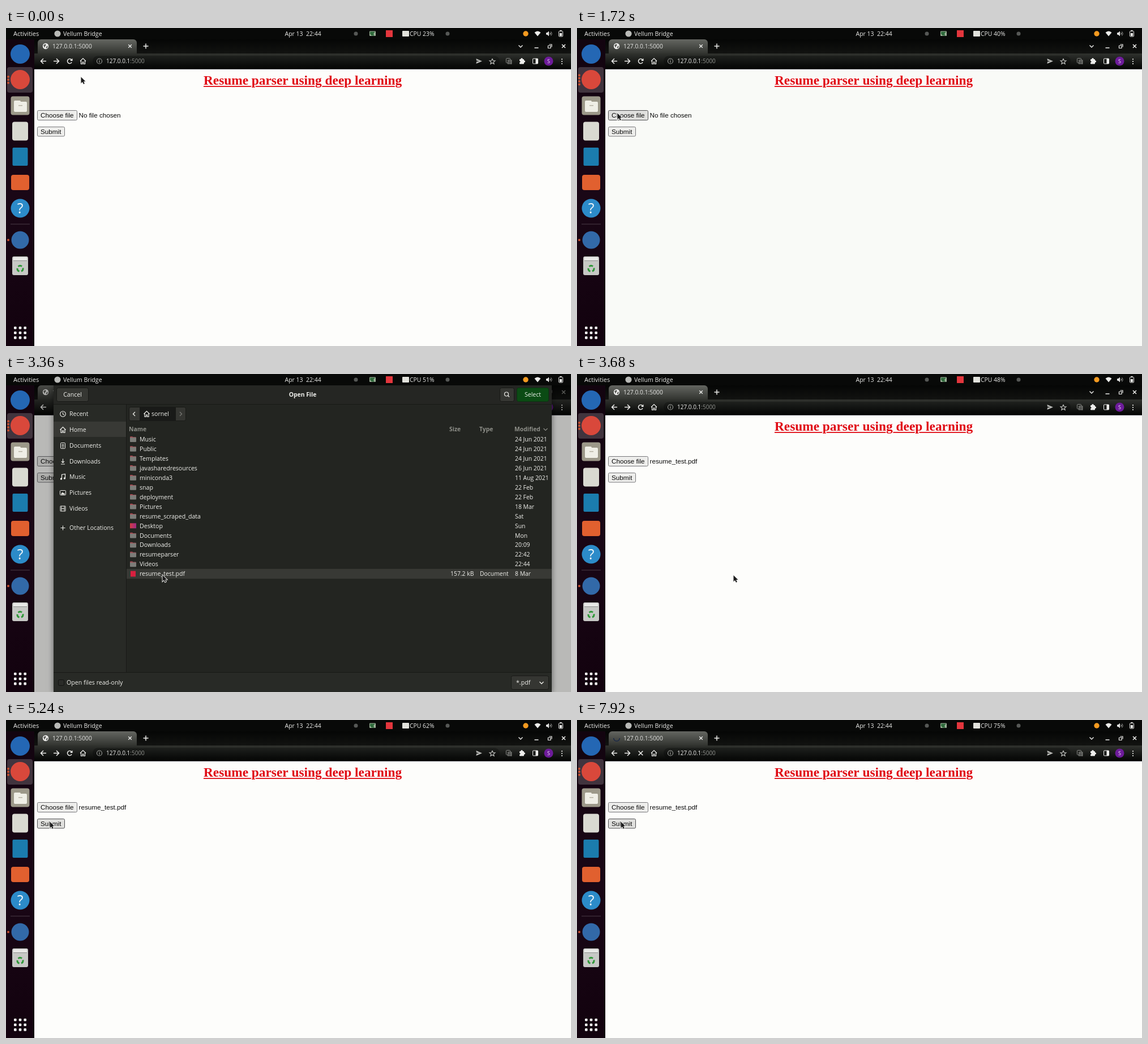
Recreate the animation shown at these times as an HTML page with a canvas. Size 998 by 561 pixels, loop 8000 ms.

```html
<!DOCTYPE html>
<html lang="en">
<head>
<meta charset="utf-8">
<title>Resume parser demo</title>
<style>
html, body { margin: 0; width: 100%; height: 100%; overflow: hidden; background: #000; }
canvas { display: block; width: 998px; height: 561px; }
</style>
</head>
<body>
<canvas id="stage" width="998" height="561"></canvas>
<script>
const ctx = document.getElementById('stage').getContext('2d');
const LOOP = 8000;
const UI = '"Open Sans", "Noto Sans", sans-serif';
const PAGE_FONT = '11.7px "Liberation Sans", Arial, sans-serif';
const PAPER = '#fdfdfb';
const OPEN = 1800, CLOSE = 3480, LOADING = 5440;

// time, x, y of the pointer tip
const PATH = [[0, 132, 86], [300, 132, 86], [1250, 71, 150], [1840, 71, 150],
  [2080, 250, 306], [2750, 276, 354], [4300, 276, 355], [5040, 77, 179], [LOOP, 77, 179]];
const CPU = [23, 40, 51, 48, 62, 75];

const PLACES = [['Recent', 70], ['Home', 98], ['Documents', 126], ['Downloads', 154],
  ['Music', 181], ['Pictures', 209], ['Videos', 237], ['Other Locations', 271]];
const FILES = [['Music', '24 Jun 2021'], ['Public', '24 Jun 2021'], ['Templates', '24 Jun 2021'],
  ['javasharedresources', '26 Jun 2021'], ['miniconda3', '11 Aug 2021'], ['snap', '22 Feb'],
  ['deployment', '22 Feb'], ['Pictures', '18 Mar'], ['resume_scraped_data', 'Sat'],
  ['Desktop', 'Sun'], ['Documents', 'Mon'], ['Downloads', '20:09'], ['resumeparser', '22:42'],
  ['Videos', '22:44'], ['resume_test.pdf', '8 Mar']];

const clamp = v => Math.max(0, Math.min(1, v));
const ramp = (t, from, to) => clamp((t - from) / (to - from));
const smooth = p => p * p * (3 - 2 * p);
const mix = (a, b, p) => a + (b - a) * p;
const shade = (a, b, p) => `rgb(${a.map((v, i) => Math.round(mix(v, b[i], p))).join(',')})`;
const dialogFocus = t => ramp(t, 2080, 2280) * (1 - ramp(t, CLOSE, CLOSE + 120));

function rect(x, y, w, h, color) {
  ctx.fillStyle = color;
  ctx.fillRect(x, y, w, h);
}

function box(x, y, w, h, r, fill, stroke) {
  ctx.beginPath();
  ctx.roundRect(x, y, w, h, r);
  if (fill) { ctx.fillStyle = fill; ctx.fill(); }
  if (stroke) { ctx.strokeStyle = stroke; ctx.lineWidth = 1; ctx.stroke(); }
}

function disc(x, y, r, color) {
  ctx.beginPath();
  ctx.arc(x, y, r, 0, Math.PI * 2);
  ctx.fillStyle = color;
  ctx.fill();
}

function arc(x, y, r, from, to, color, width = 1.3) {
  ctx.beginPath();
  ctx.arc(x, y, r, from, to);
  ctx.strokeStyle = color;
  ctx.lineWidth = width;
  ctx.stroke();
}

const ring = (x, y, r, color, width) => arc(x, y, r, 0, Math.PI * 2, color, width);

// Each string of "x,y x,y" points is one open stroke.
function lines(x, y, color, width, ...strokes) {
  ctx.strokeStyle = color;
  ctx.lineWidth = width;
  ctx.beginPath();
  for (const stroke of strokes) {
    stroke.split(' ').forEach((pair, i) => {
      const [dx, dy] = pair.split(',').map(Number);
      if (i) ctx.lineTo(x + dx, y + dy); else ctx.moveTo(x + dx, y + dy);
    });
  }
  ctx.stroke();
}

function shape(x, y, path, color) {
  ctx.save();
  ctx.translate(x, y);
  ctx.fillStyle = color;
  ctx.fill(new Path2D(path));
  ctx.restore();
}

function text(s, x, y, color, font = '10.6px ' + UI, align = 'left') {
  ctx.font = font;
  ctx.textAlign = align;
  ctx.fillStyle = color;
  ctx.fillText(s, x, y);
}

function gradient(y0, y1, ...colors) {
  const g = ctx.createLinearGradient(0, y0, 0, y1);
  colors.forEach((c, i) => g.addColorStop(i / (colors.length - 1), c));
  return g;
}

const cross = (x, y, r, color, width) =>
  lines(x, y, color, width, `${-r},${-r} ${r},${r}`, `${r},${-r} ${-r},${r}`);
const house = (x, y, color) =>
  lines(x, y, color, 1.2, '-5,0 0,-5 5,0', '-3.5,-1 -3.5,5 -1,5 -1,1.5 1,1.5 1,5 3.5,5 3.5,-1');

function topBar(t) {
  const white = '#ececea';
  rect(0, 0, 998, 20, '#080908');
  text('Activities', 13, 13.7, white, '11px ' + UI);
  disc(91, 10, 5.6, '#b9bab7');
  text('Vellum Bridge', 101, 13.7, white);
  text('Apr 13  22:44', 492.5, 13.5, white, '10.5px ' + UI);
  disc(618, 10, 3.5, '#565856');
  disc(780, 10, 3.5, '#565856');
  box(642, 5.5, 11, 8.5, 1, '#9fb29a');
  shape(642, 5.5, 'M1 1H10L7 5 9 8H4L1 5Z', '#2f6b3c');
  rect(671, 4, 12, 12, '#e3363d');
  box(700, 5, 12, 10, 1, '#e2e2dc');
  const value = CPU[Math.min(5, Math.floor((t + 900) / 1500))];
  text(`CPU ${value}%`, 713, 13.7, white, '10.4px ' + UI);
  disc(918, 10, 4.7, '#f49a20');
  shape(939, 10, 'M0 4.5L-5.5 -2Q0 -7 5.5 -2Z', white);
  shape(956, 10, 'M-2 -1.7H0L3 -4.5V4.5L0 1.7H-2Z', white);
  arc(959, 10, 2.5, -0.8, 0.8, white, 1);
  arc(959, 10, 5, -0.8, 0.8, '#a9a9a7', 1);
  box(976.5, 5.5, 7, 9.5, 1, null, white);
  rect(978.5, 4, 3, 1.5, white);
  rect(978, 9, 4, 5, white);
}

function dock(t) {
  rect(0, 20, 50, 541, gradient(20, 561, '#12040f', '#1a0716', '#12020e'));
  box(2, 69, 45, 45, 4, '#41343e');
  const count = t >= 1560 && t < CLOSE + 120 ? 4 : 3;
  for (let i = 0; i < count; i++) disc(4, 91.3 + (i - (count - 1) / 2) * 5.4, 2, '#c9502f');
  disc(4, 374, 2, '#c9502f');

  disc(25, 46, 17, '#2467b4');
  disc(25, 91, 17, '#d9483b');

  box(8.5, 120.5, 33, 33, 4, '#9c9889');
  box(14, 128, 12, 8, 2, '#efeee6');
  box(14, 130, 23, 18, 2, '#efeee6');
  rect(22, 136, 7, 1.5, '#b8b4a6');

  box(11, 165.5, 28, 33, 4, '#d9d9d1');
  box(11.5, 211, 27, 32, 2, '#1b7cae');
  box(9, 259, 32, 27, 4, '#e1602f');

  disc(25, 318, 16.5, '#2c8bc9');
  text('?', 25, 327, '#f4f8fb', '25px ' + UI, 'center');
  rect(8, 345.5, 34, 1, '#4b3d48');
  disc(25, 374, 15.5, '#3269a8');

  box(11, 403, 28, 33, 3, '#c7c8c5');
  rect(13, 404.5, 24, 6, '#e9e9e7');
  lines(13, 410.5, '#8e8f8d', 1, '0,0 24,0');
  for (let i = 0; i < 3; i++) {
    const a = i * Math.PI * 2 / 3 - Math.PI / 2;
    arc(25, 424.5, 5, a - 0.75, a + 0.65, '#2f9838', 3);
  }

  for (let i = 0; i < 9; i++) {
    box(14 + i % 3 * 8.7, 526.7 + Math.floor(i / 3) * 8.7, 4.6, 4.6, 1.3, '#f4f4f4');
  }
}

function browser(t) {
  const white = '#eeeeec', grey = '#a3a5a1';
  const control = shade([238, 238, 236], [120, 122, 118], dialogFocus(t));
  const loading = t >= LOADING;
  rect(50, 20, 948, 25, gradient(20, 45, '#050605', '#121311'));
  box(56, 20, 175, 27, [6, 6, 0, 0], gradient(20, 46, '#646661', '#30322e'));
  rect(50, 45, 948, 28, gradient(45, 72, '#30322e', '#030403'));
  box(153, 49, 719, 19, 9.5, gradient(49, 68, '#1e201d', '#080908'));

  if (loading) {
    const a = -(t - 7920) / 1320 * Math.PI * 2;
    arc(70, 32, 5.3, a, a + Math.PI, '#1c2a48', 1.6);
    cross(112.5, 58.5, 3.8, white, 1.5);
  } else {
    disc(70, 32, 5.2, white);
    shape(70, 32, 'M-4 -1L-1 -4 1 -2 -1 0 -1 3ZM1 1L4 -1 3 3 1 4Z', '#555752');
    arc(112.5, 58.5, 4, 0.5, 5.5, white, 1.5);
    shape(112.5, 58.5, 'M5 -5V-0.5H0.5Z', white);
  }
  text('127.0.0.1:5000', 82, 36, '#e6e6e4', '10.3px ' + UI);
  cross(219, 32, 2.8, white, 1.3);
  lines(247, 32, white, 1.5, '-4.5,0 4.5,0', '0,-4.5 0,4.5');
  lines(909, 32, control, 1.4, '-3.5,-1.5 0,2 3.5,-1.5');
  lines(937, 35, control, 1.5, '-3.5,0 3.5,0');
  lines(960, 32, control, 1.2, '-2.5,-1 2,-1 2,3.5 -2.5,3.5 -2.5,-1', '-0.5,-3 4,-3 4,1.5');
  cross(985, 32, 3, control, 1.5);

  lines(66, 58.5, white, 1.5, '5,0 -4.5,0', '0,-4.5 -4.5,0 0,4.5');
  lines(89, 58.5, white, 1.5, '-5,0 4.5,0', '0,-4.5 4.5,0 0,4.5');
  house(136, 58.5, white);
  ring(165, 58.5, 4.5, grey, 1.1);
  lines(165, 58.5, grey, 1.2, '0,-0.5 0,2.5', '0,-2.5 0,-1.3');
  const font = '10px ' + UI;
  text('127.0.0.1', 177, 62, white, font);
  text(':5000', 177 + ctx.measureText('127.0.0.1').width, 62, '#8f918d', font);

  shape(835, 58.5, 'M-4.5 -4.5L6 0 -4.5 4.5 -4 1 1 0 -4 -1Z', '#b9bab7');
  lines(859, 59, '#c5c6c3', 1.1,
    '0,-5 1.4,-1.5 5,-1.3 2.2,1 3.1,4.5 0,2.5 -3.1,4.5 -2.2,1 -5,-1.3 -1.4,-1.5 0,-5');
  box(883.5, 53.5, 7, 8, 1, null, '#8c8e8a');
  box(886, 56, 7.5, 8, 1, '#777975');
  lines(887, 58, '#222', 1, '0,0 5,0', '0,2.5 5,2.5', '0,5 5,5');
  box(907, 55, 8, 8.5, 1, white);
  disc(911, 54.8, 1.8, white);
  disc(915.3, 59, 1.8, white);
  disc(907.2, 59.5, 1.3, '#171816');
  box(930.5, 54, 9, 9, 1, null, white);
  rect(935.5, 54, 4, 9, white);
  disc(958.5, 58.5, 8, '#6d1b9a');
  text('S', 958.5, 61.7, '#f0e8f4', '9px ' + UI, 'center');
  for (let i = -1; i < 2; i++) disc(982, 59 + i * 4, 1.1, white);
}

function button(label, x, y, w, h, hover) {
  box(x + 0.5, y + 0.5, w - 1, h - 1, 2, hover ? '#e0e0de' : '#eeeeec', hover ? '#4e4e50' : '#77777a');
  text(label, x + 6, y + 12.8, '#0a0a0a', PAGE_FONT);
}

function page(t, [mx, my]) {
  rect(50, 73, 948, 488, t >= 1560 && t < OPEN + 160 ? '#f9faf7' : PAPER);
  rect(50, 72, 948, 1, '#33343d');

  // The paper-coloured halo breaks the underline around descenders.
  const title = 'Resume parser using deep learning';
  const font = 'bold 23.35px "Liberation Serif", "Times New Roman", serif';
  ctx.font = font;
  const width = ctx.measureText(title).width;
  rect(524 - width / 2, 102.2, width, 1.8, '#e00a14');
  ctx.textAlign = 'center';
  ctx.strokeStyle = PAPER;
  ctx.lineWidth = 3;
  ctx.lineJoin = 'round';
  ctx.strokeText(title, 524, 100);
  ctx.lineJoin = 'miter';
  text(title, 524, 100, '#e00a14', font, 'center');

  const over = (x, y, w, h) => mx >= x && mx < x + w && my >= y && my < y + h;
  button('Choose file', 55, 145, 71, 18, over(55, 145, 71, 18));
  button('Submit', 55, 174, 49, 17.5, over(55, 174, 49, 17.5));
  text(t < CLOSE + 80 ? 'No file chosen' : 'resume_test.pdf', 128.5, 157.8, '#0a0a0a', PAGE_FONT);
}

function placeIcon(i, y, c) {
  const x = 100.5;
  if (i === 0) { ring(x, y, 4.8, c, 1.1); lines(x, y, c, 1.1, '0,-3 0,0.5 2.5,1.5'); }
  if (i === 1) house(x, y, c);
  if (i === 2) { box(x - 4, y - 5, 8, 10, 1, null, c); lines(x, y, c, 1, '-2,-2 2,-2', '-2,0 2,0', '-2,2.5 2,2.5'); }
  if (i === 3) lines(x, y, c, 1.1, '0,-5 0,2', '-2.5,-0.5 0,2 2.5,-0.5', '-3.5,4.5 3.5,4.5');
  if (i === 4) { lines(x, y, c, 1.2, '-2,3 -2,-4 4,-5 4,2'); disc(x - 3, y + 3.5, 1.7, c); disc(x + 3, y + 2.5, 1.7, c); }
  if (i === 5) { box(x - 5, y - 4, 10, 8, 1, null, c); shape(x, y, 'M-4 3L-1 -1 1 1 2 0 4 3Z', c); }
  if (i === 6) { box(x - 4.5, y - 4.5, 9, 9, 0.5, null, c); lines(x, y, c, 1, '-2.5,-4 -2.5,4', '2.5,-4 2.5,4', '-2.5,0 2.5,0'); }
  if (i === 7) lines(x, y, c, 1.1, '-4,0 4,0', '0,-4 0,4');
}

function fileIcon(name, y) {
  if (name === 'Desktop') {
    const g = ctx.createLinearGradient(219, 0, 230, 0);
    g.addColorStop(0, '#d23b45');
    g.addColorStop(1, '#a02a84');
    rect(219, y - 4.5, 11, 9, g);
  } else if (name.endsWith('.pdf')) {
    rect(220, y - 5, 9, 10, '#d8203f');
  } else {
    box(219, y - 5, 5, 4, 1, '#a8434c');
    box(219, y - 3.8, 11, 8.5, 1, '#7c7d79');
    rect(219.5, y - 3.8, 10, 1, '#a0555a');
  }
}

function dialog(t) {
  const focus = dialogFocus(t);
  const ink = shade([166, 167, 161], [240, 240, 236], focus);
  const sideInk = shade([190, 191, 186], [240, 240, 236], focus);
  const bold = 'bold 10.4px ' + UI;
  const body = shade([46, 47, 43], [35, 37, 33], focus);
  const side = shade([49, 50, 46], [40, 42, 38], focus);
  const lit = shade([66, 67, 63], [56, 57, 53], focus);
  const edge = '#181916';

  ctx.save();
  ctx.shadowColor = 'rgba(0,0,0,0.5)';
  ctx.shadowBlur = 10;
  ctx.shadowOffsetY = 2;
  rect(84, 20, 880, 541, body);
  ctx.restore();
  rect(84, 20, 880, 33, shade([43, 44, 40], [37, 38, 35], focus));
  rect(84, 53, 128, 474, side);
  rect(84, 53, 880, 1, edge);
  rect(212, 54, 1, 473, edge);

  box(89.5, 24.5, 56, 24, 3, '#363733', edge);
  text('Cancel', 117.5, 40.2, sideInk, undefined, 'center');
  text('Open File', 524, 40.2, sideInk, bold, 'center');
  box(872.5, 24.5, 25, 24, 3, '#363733', edge);
  ring(884, 35.5, 3.5, sideInk, 1.2);
  lines(884, 35.5, sideInk, 1.3, '2.5,2.5 5,5');
  box(902.5, 24.5, 56, 24, 3, t < 3280 ? '#107a1b' : '#0b4b14', '#0a3510');
  text('Select', 930.5, 40.2, '#e9efe8', undefined, 'center');

  rect(84, 84, 128, 27, lit);
  PLACES.forEach(([name, y], i) => {
    placeIcon(i, y + 0.5, sideInk);
    text(name, 112, y + 3.8, sideInk, '10.5px ' + UI);
  });

  box(217.5, 58.5, 100, 24, 3, '#353632', edge);
  rect(236, 59, 63, 24, '#191a18');
  rect(299, 59, 1, 24, edge);
  lines(226.5, 70.5, sideInk, 1.3, '1.5,-3.5 -2,0 1.5,3.5');
  house(248.5, 70.5, sideInk);
  text('sornel', 257, 74.2, sideInk);
  lines(308.5, 70.5, '#777873', 1.3, '-1.5,-3.5 2,0 -1.5,3.5');

  for (const [name, x] of [['Name', 217], ['Size', 783], ['Type', 836], ['Modified', 898]]) {
    text(name, x, 101, '#8e8f89', bold);
  }
  lines(953, 97.5, '#8e8f89', 1.1, '-3.5,-1.5 0,2 3.5,-1.5');

  const chosen = t < 3000 ? 0 : 14;
  FILES.forEach(([name, date], i) => {
    const y = 115.2 + i * 16.95;
    if (i === chosen) rect(213, y - 8.7, 751, 17.4, lit);
    fileIcon(name, y);
    text(name, 236, y + 3.8, ink);
    text(date, 899, y + 3.8, ink, '10.4px ' + UI);
  });
  text('157.2 kB', 785, 356.3, ink, '10.4px ' + UI);
  text('Document', 837, 356.3, ink, '10.4px ' + UI);

  rect(84, 527, 880, 34, side);
  rect(84, 526, 880, 1, edge);
  box(92.5, 539.5, 10, 10, 2, '#2a2b28', '#121311');
  text('Open files read-only', 107, 548, sideInk);
  box(892.5, 532.5, 66, 24, 3, '#353632', edge);
  text('*.pdf', 901, 548, sideInk);
  lines(946, 544.5, sideInk, 1.3, '-3.5,-1.5 0,2 3.5,-1.5');
}

function pointerAt(t) {
  const i = PATH.findIndex((p, n) => n && t <= p[0]);
  const [t0, x0, y0] = PATH[i - 1], [t1, x1, y1] = PATH[i];
  const p = smooth(ramp(t, t0, t1));
  return [mix(x0, x1, p), mix(y0, y1, p)];
}

function pointer([x, y]) {
  ctx.save();
  ctx.translate(x, y);
  const arrow = new Path2D('M0.5 0.5V11.5L3 9 5 13 6.8 12 5 8.3H8.3Z');
  ctx.strokeStyle = '#f2f2f0';
  ctx.lineWidth = 1.8;
  ctx.stroke(arrow);
  ctx.fillStyle = '#1b1b1b';
  ctx.fill(arrow);
  ctx.restore();
}

function draw(t) {
  const mouse = pointerAt(t);
  browser(t);
  page(t, mouse);
  const opened = ramp(t, OPEN, OPEN + 140) * (1 - ramp(t, CLOSE, CLOSE + 120));
  if (opened) {
    rect(50, 20, 948, 541, `rgba(0,0,0,${0.27 * opened})`);
    ctx.save();
    ctx.translate(0, 290);
    ctx.scale(1, 1 - (1 - opened) ** 2);
    ctx.translate(0, -290);
    dialog(t);
    ctx.restore();
  }
  topBar(t);
  dock(t);
  pointer(mouse);
}

const start = performance.now();
function tick() {
  draw((performance.now() - start) % LOOP);
  requestAnimationFrame(tick);
}
tick();
</script>
</body>
</html>
```
